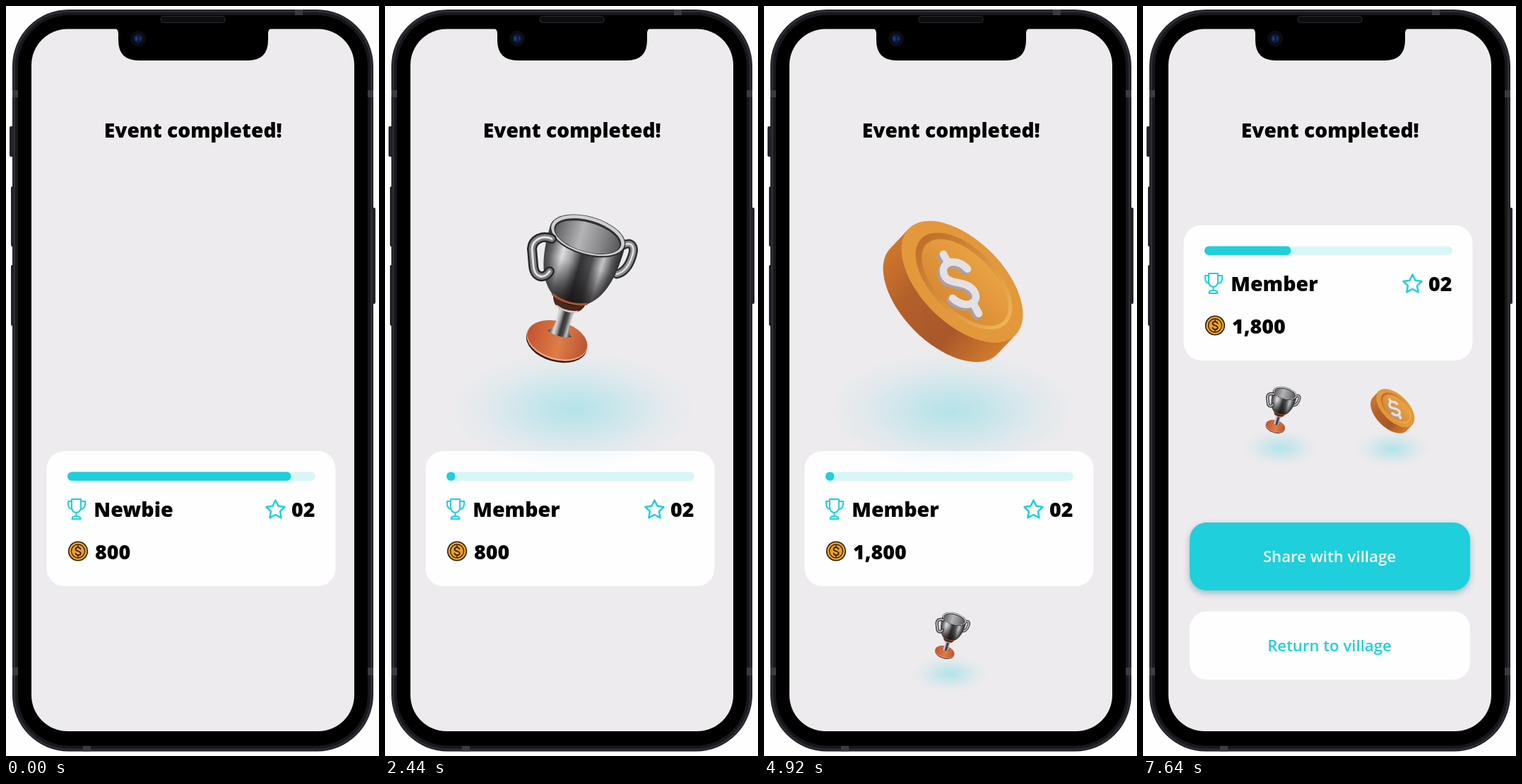
Recreate the animation shown at these times as an HTML page. Size 528 px wide and 1060 px high, loop 7.68 s.

```html
<!DOCTYPE html>
<html lang="en">
<head>
<meta charset="utf-8">
<title>Event completed</title>
<style>
  html, body { margin: 0; width: 100%; height: 100%; overflow: hidden; background: #fefeff; }
  svg { display: block; width: 528px; height: 1060px; font-family: "Open Sans", sans-serif; }
  .title { font-size: 28.2px; font-weight: 800; text-anchor: middle; }
  .bold { font-size: 28.6px; font-weight: 800; }
  .label { font-size: 22.2px; font-weight: 600; text-anchor: middle; }
  .line { fill: none; stroke-linecap: round; stroke-linejoin: round; }
  #share rect { filter: drop-shadow(0 4px 5px rgba(20, 110, 120, .38)); }
</style>
</head>
<body>
<svg viewBox="0 0 528 1060">
  <defs>
    <radialGradient id="glow">
      <stop offset="0" stop-color="#1fcfdc" stop-opacity=".28"/>
      <stop offset=".35" stop-color="#1fcfdc" stop-opacity=".17"/>
      <stop offset=".7" stop-color="#1fcfdc" stop-opacity=".055"/>
      <stop offset="1" stop-color="#1fcfdc" stop-opacity="0"/>
    </radialGradient>
    <linearGradient id="silver">
      <stop offset="0" stop-color="#39383a"/>
      <stop offset=".1" stop-color="#656466"/>
      <stop offset=".25" stop-color="#dddcde"/>
      <stop offset=".37" stop-color="#a3a2a4"/>
      <stop offset=".5" stop-color="#333234"/>
      <stop offset=".64" stop-color="#4d4c4e"/>
      <stop offset=".78" stop-color="#c4c3c5"/>
      <stop offset=".9" stop-color="#575658"/>
      <stop offset="1" stop-color="#252426"/>
    </linearGradient>
    <linearGradient id="cupShade" x2="0" y2="1">
      <stop offset=".4" stop-color="#151314" stop-opacity="0"/>
      <stop offset=".8" stop-color="#151314" stop-opacity=".65"/>
      <stop offset="1" stop-color="#151314" stop-opacity=".9"/>
    </linearGradient>
    <linearGradient id="cupInside">
      <stop offset="0" stop-color="#5f5e60"/>
      <stop offset=".4" stop-color="#b4b3b5"/>
      <stop offset=".7" stop-color="#8b8a8c"/>
      <stop offset="1" stop-color="#58575a"/>
    </linearGradient>
    <linearGradient id="foot">
      <stop offset="0" stop-color="#c4532f"/>
      <stop offset=".55" stop-color="#dd7d47"/>
      <stop offset="1" stop-color="#b95433"/>
    </linearGradient>
    <linearGradient id="coinEdge" gradientUnits="userSpaceOnUse" x1="175" y1="335" x2="345" y2="490">
      <stop offset="0" stop-color="#d2792b"/>
      <stop offset=".3" stop-color="#b4602b"/>
      <stop offset=".65" stop-color="#a9572a"/>
      <stop offset="1" stop-color="#d9812d"/>
    </linearGradient>
    <linearGradient id="coinWell" x2="0" y2="1">
      <stop offset="0" stop-color="#e9a242"/>
      <stop offset="1" stop-color="#d98a34"/>
    </linearGradient>
    <linearGradient id="coinLip">
      <stop offset="0" stop-color="#bd6f29"/>
      <stop offset="1" stop-color="#efb452"/>
    </linearGradient>
    <path id="leftHandle" class="line" d="M236 329C223 323 209 330 208 343L210 366C211 384 225 387 233 375"/>
    <path id="rightHandle" class="line" d="M337 338C350 332 354 341 350 353C346 366 340 376 328 379"/>
    <path id="cup" d="M-55 0C-55 28-53 58-38 80C-27 95-14 101 0 101C14 101 27 95 38 80C53 58 55 28 55 0z"/>
    <path id="dollar" class="line" d="M288 370C277 356 253 356 254 374C256 395 286 383 298 402C307 420 283 427 267 411M254 349l6 11M297 420l7 13"/>
  </defs>

  <!-- phone -->
  <g fill="#24252a">
    <rect x="5" y="170" width="7" height="43" rx="2"/>
    <rect x="7" y="255" width="6" height="85" rx="2"/>
    <rect x="7" y="366" width="6" height="86" rx="2"/>
    <rect x="516" y="285" width="7" height="136" rx="2"/>
  </g>
  <rect x="9" y="5" width="511" height="1048.500" rx="80" fill="#17181b"/>
  <rect x="11.500" y="7.500" width="506" height="1043.500" rx="77.500" fill="none" stroke="#2c2d32" stroke-width="3"/>
  <path d="M409 5h11v8h-11zM109 1045.500h11v8h-11zM9 119h8v10H9zM512 119h8v10h-8zM9 935h8v11H9zM512 935h8v11h-8z" fill="#3b3c40"/>
  <rect x="17" y="13" width="495" height="1032.500" rx="72"/>
  <rect x="36" y="32.500" width="457" height="992.500" rx="51" fill="#edebee"/>
  <path d="M153 31C158 32.500 159 35 159 40V48Q159 77 188 77H342Q371 77 371 48V40C371 35 372 32.500 377 31Z"/>
  <rect x="219" y="14.500" width="91" height="9" rx="3.500" fill="#0d0d0f" stroke="#2a2b2f"/>
  <circle cx="187" cy="46" r="11" fill="#0b0d13"/>
  <circle cx="187" cy="46" r="6.500" fill="#0d1a3c"/>
  <ellipse cx="184.500" cy="46" rx="2" ry="3.500" fill="#1b3a78"/>
  <ellipse cx="190" cy="46" rx="1.500" ry="3" fill="#193265"/>

  <text class="title" x="264.700" y="185.700">Event completed!</text>

  <g id="card">
    <rect x="57.500" y="629" width="409" height="191" rx="25" fill="#fefdff"/>
    <rect x="87" y="658.500" width="351" height="12.500" rx="6.250" fill="#d8f6f8"/>
    <rect id="bar" x="87" y="658.500" height="12.500" rx="6.250" fill="#1fcfdc"/>
    <g class="line" stroke="#1fcfdc">
      <path stroke-width="2" d="M93 697h13v12a6.500 7 0 0 1-13 0zM93 700h-5v4q0 6 6 7.500M106 700h6v4q0 6-6 7.500M99.500 716v5M93.500 725q0-4 6-4t6 4z"/>
      <path stroke-width="2.500" d="M381.500 698.500l4 8.300 9 1.200-6.500 6.300 1.600 9-8.100-4.300-8.100 4.300 1.600-9-6.500-6.300 9-1.200z"/>
    </g>
    <circle cx="102" cy="770.500" r="13.300" fill="#f4a629" stroke="#2b1c0c" stroke-width="1.600"/>
    <circle cx="102" cy="770.500" r="9.500" fill="#eda024" stroke="#2b1c0c" stroke-width="1.300"/>
    <path class="line" stroke="#2b1c0c" stroke-width="1.700" d="M105.500 767.500C104 764 98.500 764.500 98.500 767.700C98.500 771.500 105.700 769.500 105.700 773.500C105.700 777 99.500 777 98.500 773.500M102 763v2M102 776v2"/>
    <g class="bold">
      <text id="newbie" x="124.300" y="722">Newbie</text>
      <text id="member" x="124.300" y="722">Member</text>
      <text x="437.500" y="722" text-anchor="end">02</text>
      <text id="oldCoins" x="126" y="782">800</text>
      <text id="newCoins" x="126" y="782">1,800</text>
    </g>
  </g>

  <g id="trophy">
    <ellipse cx="266" cy="570" rx="175" ry="84" fill="url(#glow)"/>
    <use href="#rightHandle" stroke="#2e2d2f" stroke-width="13"/>
    <use href="#rightHandle" stroke="#8d8c8e" stroke-width="8"/>
    <use href="#rightHandle" stroke="#e2e1e3" stroke-width="2.500"/>
    <g transform="translate(287 325) rotate(16)">
      <ellipse cx="-1" cy="157" rx="44" ry="27" fill="#2f1a16"/>
      <ellipse cx="-1" cy="154.500" rx="44" ry="27" fill="#e9a680"/>
      <ellipse cx="-1" cy="153" rx="43.500" ry="26" fill="url(#foot)"/>
      <path d="M-11 104h22l-1 26q1 9 7 14q-18 7-35 0q7-5 8-14z" fill="url(#silver)"/>
      <path d="M-24 93h48q-2 13-14 17h-20q-12-4-14-17z" fill="#4c271c"/>
      <path class="line" d="M-15 107q15 6 30 0" stroke="#d3cfcf" stroke-width="2.500"/>
      <use href="#cup" fill="url(#silver)"/>
      <use href="#cup" fill="url(#cupShade)"/>
      <path class="line" d="M-25 93Q0 103 25 93" stroke="#a9532f" stroke-width="3"/>
      <ellipse rx="55" ry="27.500" fill="#2f2e30"/>
      <ellipse cy="-.7" rx="53.500" ry="26" fill="#cfced0"/>
      <ellipse cy=".5" rx="49" ry="22.500" fill="#2f2e30"/>
      <ellipse cy="1.800" rx="47" ry="20.500" fill="url(#cupInside)"/>
    </g>
    <use href="#leftHandle" stroke="#262527" stroke-width="14"/>
    <use href="#leftHandle" stroke="#7d7c7e" stroke-width="9"/>
    <use href="#leftHandle" stroke="#e4e3e5" stroke-width="3"/>
  </g>

  <g id="coin">
    <ellipse cx="266" cy="570" rx="175" ry="84" fill="url(#glow)"/>
    <g fill="url(#coinEdge)">
      <path d="M205.200 312.700L178.700 340.700A106.500 58.600 45 0 0 329.300 491.300L355.800 463.300z"/>
    </g>
    <ellipse rx="106.500" ry="58.600" transform="translate(280.500 388) rotate(45)" fill="#e3983c"/>
    <ellipse rx="85" ry="46" transform="translate(283 387) rotate(45)" fill="url(#coinLip)"/>
    <ellipse rx="77" ry="40" transform="translate(284.500 389) rotate(45)" fill="url(#coinWell)"/>
    <use href="#dollar" x="-3" y="3" stroke="#a9a0a6" stroke-width="11"/>
    <use href="#dollar" stroke="#e3e1e5" stroke-width="10.500"/>
  </g>

  <g id="buttons">
    <g id="share">
      <rect x="66" y="730" width="397" height="96" rx="24" fill="#1fcfdc"/>
      <text class="label" x="264" y="786" fill="#fff">Share with village</text>
    </g>
    <rect x="66" y="855.500" width="397" height="96.500" rx="24" fill="#fefdff"/>
    <text class="label" x="264" y="912" fill="#1fcfdc">Return to village</text>
  </g>
  <use id="prizesOnTop"/>
</svg>
<script>
const LOOP = 7680, STEP = 600, SMALL = .315, RISE = 365;
const start = { fill: 40, trophy: 860, level: 1710, shrink: 2563, coin: 4348, refill: 5650, finish: 6668 };
const BAR = { first: 316.5, full: 351, empty: 12.5, last: 122.5 };
const el = id => document.getElementById(id);
const mix = (a, b, p) => a + (b - a) * p;

function progress(time, from) {
  const x = Math.min(1, Math.max(0, (time - from) / STEP));
  return 1 - (1 - x) ** 1.72;
}

// Places a prize so that its full-size point (266, 400) lands on x, y.
function place(id, x, y, scale, opacity) {
  el(id).setAttribute("transform", `translate(${x} ${y}) scale(${scale}) translate(-266 -400)`);
  el(id).setAttribute("opacity", opacity);
}

function crossfade(oldId, newId, p) {
  el(oldId).setAttribute("opacity", 1 - p);
  el(newId).setAttribute("opacity", p);
}

function draw(time) {
  const p = {};
  for (const name in start) p[name] = progress(time, start[name]);

  let width = mix(BAR.first, BAR.full, p.fill);
  width = mix(width, BAR.empty, p.level);
  el("bar").setAttribute("width", mix(width, BAR.last, p.refill));
  crossfade("newbie", "member", p.level);
  crossfade("oldCoins", "newCoins", p.coin);

  el("card").setAttribute("transform", `translate(0 ${-319 * p.finish})`);
  el("buttons").setAttribute("opacity", p.finish);

  const trophyX = mix(mix(266, 263, p.shrink), 194.5, p.finish);
  const trophyY = mix(mix(400 + RISE * (1 - p.trophy), 890, p.shrink), 571, p.finish);
  place("trophy", trophyX, trophyY, mix(1, SMALL, p.shrink), p.trophy);

  const coinY = mix(400 + RISE * (1 - p.coin), 572, p.finish);
  place("coin", mix(266, 352.7, p.finish), coinY, mix(1, SMALL, p.finish), p.coin);
}

const began = performance.now();
function tick() {
  draw((performance.now() - began) % LOOP);
  requestAnimationFrame(tick);
}
tick();
</script>
</body>
</html>
```
